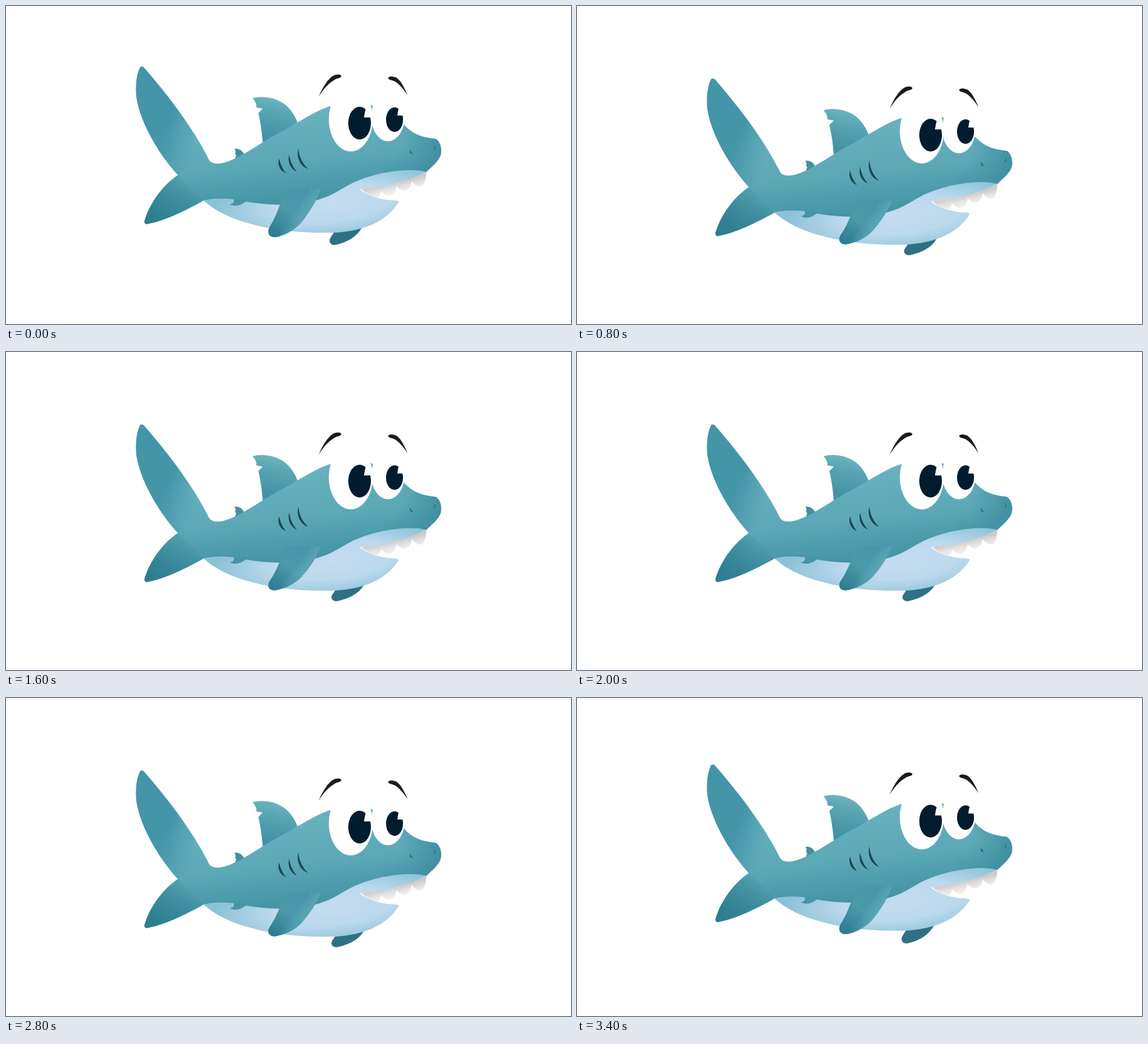
Write an HTML page that moves like this. It is 898 px wide and 505 px high and loops after 3600 ms.

```html
<!DOCTYPE html>
<html lang="en">
<head>
<meta charset="utf-8">
<title>Swimming shark</title>
<style>
  html, body { margin: 0; width: 100%; height: 100%; overflow: hidden; background: #fff; }
  svg { display: block; width: 100vw; height: 100vh; }
</style>
</head>
<body>
<svg viewBox="0 0 898 505" xmlns="http://www.w3.org/2000/svg">
  <defs>
    <linearGradient id="skin" gradientUnits="userSpaceOnUse" x1="470" y1="170" x2="486" y2="312">
      <stop offset="0" stop-color="#68b1bf"/>
      <stop offset=".5" stop-color="#5ca8b6"/>
      <stop offset="1" stop-color="#4293a4"/>
    </linearGradient>
    <linearGradient id="tailTone" gradientUnits="userSpaceOnUse" x1="256" y1="190" x2="306" y2="210">
      <stop offset="0" stop-color="#4495a8"/>
      <stop offset="1" stop-color="#4495a8" stop-opacity="0"/>
    </linearGradient>
    <linearGradient id="lobeTone" gradientUnits="userSpaceOnUse" x1="296" y1="276" x2="232" y2="336">
      <stop offset="0" stop-color="#2e7d91" stop-opacity="0"/>
      <stop offset="1" stop-color="#2e7d91"/>
    </linearGradient>
    <radialGradient id="noseTone" gradientUnits="userSpaceOnUse" cx="600" cy="215" r="96">
      <stop offset=".3" stop-color="#3f8fa1" stop-opacity="0"/>
      <stop offset="1" stop-color="#3f8fa1"/>
    </radialGradient>
    <radialGradient id="belly" gradientUnits="userSpaceOnUse" cx="0" cy="0" r="1"
      gradientTransform="translate(518 312) rotate(-6) scale(190 60)">
      <stop offset="0" stop-color="#c5dcf1"/>
      <stop offset=".5" stop-color="#bcd9ed"/>
      <stop offset="1" stop-color="#8bc1d6"/>
    </radialGradient>
    <linearGradient id="dorsal" gradientUnits="userSpaceOnUse" x1="436" y1="150" x2="424" y2="208">
      <stop offset="0" stop-color="#6bb2bf"/>
      <stop offset=".35" stop-color="#58a4b3"/>
      <stop offset="1" stop-color="#4293a5"/>
    </linearGradient>
    <linearGradient id="fin" gradientUnits="userSpaceOnUse" x1="478" y1="292" x2="428" y2="364">
      <stop offset="0" stop-color="#4696a7"/>
      <stop offset=".5" stop-color="#4b99aa"/>
      <stop offset="1" stop-color="#2e7d91"/>
    </linearGradient>
    <linearGradient id="finEdge" gradientUnits="userSpaceOnUse" x1="457" y1="323" x2="481" y2="338">
      <stop offset="0" stop-color="#6bb0c0" stop-opacity="0"/>
      <stop offset="1" stop-color="#6bb0c0" stop-opacity=".7"/>
    </linearGradient>
    <linearGradient id="teeth" gradientUnits="userSpaceOnUse" x1="613" y1="281" x2="618" y2="303">
      <stop offset="0" stop-color="#cdc8c8"/>
      <stop offset=".45" stop-color="#e6e4e4"/>
      <stop offset="1" stop-color="#fafafa"/>
    </linearGradient>
    <path id="bodyShape" d="M213 97.5 Q215 95 219 97.5 C254 137 299 196 322 243
      C325 250 334 252 346 249 C373 242 401 219 433 202 C464 186 488 168 515 159
      C540 151 566 151 581 158 C603 166 624 180 634 190 C645 202 660 209 683 211
      C691 216 693 228 691 236 C688 246 678 254 668 263.5
      C648 257 600 261 560 277 C534 287 522 303 483 311
      C450 317 413 317 378 310 C352 304 334 305 314 309
      C291 322 254 341 223 346.5 Q219 345 220.5 340 C229 312 250 284 273 268.5
      C246 239 213 187 207 143 C206 125 207 110 213 97.5Z"/>
  </defs>

  <g id="shark">
    <path id="farFin" fill="#2f7182" d="M571 340 C565 358 553 373 523 379.5 C514 380 512 372 517 366
      C522 358 528 350 534 340Z"/>
    <g fill="url(#dorsal)">
      <path d="M392 146.5 C406 142 428 145 443 156 C455 166 461 178 464 187 L408 217
        C407 201 404 181 401 170 L408 163 L398 161 Q399 155 392 146.5Z"/>
    </g>
    <path fill="#438fa1" d="M363 226.5 C372 226 377 231 379 237 L363 245 L366 237 L364 235 Q366 231 363 226.5Z"/>
    <path fill="url(#belly)" d="M314 309 C332 325 357 338 393 347 C436 359 481 360.500 520 360
      C570 358 606 341 624.500 311 Q622 308 612 308.500 C592 307 575 301 562 291
      C600 289 641 278 669 263 L640 250 L520 270 L480 300 L380 300Z"/>
    <path fill="url(#teeth)" d="M565 291 C601 288 641 277 668 264 Q668 279 661 287
      Q650 287 645 278 Q643 291 634 293 Q625 293 621 286 Q619 299 610 302
      Q600 301 597 294 Q594 304 588 304 Q575 300 565 291Z"/>
    <use href="#bodyShape" fill="url(#skin)"/>
    <use href="#bodyShape" fill="url(#noseTone)" clip-path="inset(0 0 0 395px)"/>
    <path fill="url(#tailTone)" d="M213 97.500 Q215 95 219 97.500 C254 137 299 196 322 243
      L273 268.500 C246 239 213 187 207 143 C206 125 207 110 213 97.500Z"/>
    <path fill="url(#lobeTone)" d="M314 309 C291 322 254 341 223 346.500 Q219 345 220.500 340
      C229 312 250 284 273 268.500Z"/>
    <path fill="#4793a7" d="M384 308 L362 307 Q364 313 356 315 C363 319 373 318 384 308Z"/>

    <g fill="#1b4650">
      <path d="M434 242 C431 251 435 262 445 265.500 C439 258 436 251 434 242Z"/>
      <path d="M450 236 C447 248 452 259 462.500 263 C455 255 452 247 450 236Z"/>
      <path d="M464.500 226 C461 241 468 255 480 258.500 C471 250 466 240 464.500 226Z"/>
      <path d="M643 228.500 Q640 234 648 235.500 Q643 233 643 228.500Z"/>
      <path d="M680 222 Q683 225 679.500 229 Q682.500 228 682 224Z"/>
    </g>

    <g id="nearFin">
      <path id="finShape" fill="url(#fin)" d="M445 292 Q474 288 500 290.500 C494 309 481 329 470 343
        C459 356 443 364 429 367 C418 368 414 360 419 351 C430 334 436 313 445 292Z"/>
      <use href="#finShape" fill="none"/>
      <path fill="url(#finEdge)" d="M484 290 L500 290.500 C494 309 481 329 470 343 C459 356 443 364 429 367
        Q453 342 484 290Z"/>
    </g>

    <g fill="#1d1a1c">
      <path d="M497 144 C503 129 513 113 523 109.500 C528 108 533 109 533 112 C531 115 526 114 521 118
        C512 123 504 133 497 144Z"/>
      <path d="M638 141.500 C633 128 626 117 620 113.500 C614 111 607 111.500 607.500 115
        C609 118 615 117.500 620 121 C627 126 633 134 638 141.500Z"/>
    </g>
    <g id="eyes">
      <g fill="#fff">
        <ellipse cx="548" cy="180" rx="35" ry="51"/>
        <ellipse cx="607" cy="176" rx="26.500" ry="39"/>
      </g>
      <g fill="#001c2e">
        <ellipse cx="562" cy="186" rx="18" ry="26"/>
        <ellipse cx="617.500" cy="180.500" rx="13.500" ry="19.500"/>
      </g>
      <path fill="#fff" d="M573 159 Q570 168 569 177 H580.500 L580 163Z M625 160 Q622.500 167 622 174 H631.500 L631 162Z"/>
    </g>
    <g id="lids" fill="#1b454e">
      <ellipse cx="548" cy="180" rx="35" ry="51"/>
      <ellipse cx="607" cy="176" rx="26.500" ry="39"/>
    </g>
  </g>
</svg>
<script>
  const STEP = 200, COUNT = 18, BLINK = 15;
  // One row per depth of the dive, from the top to the bottom of the bob.
  const poses = [
    { y: 0, near: 1, far: 1, dx: 0 },
    { y: 9.5, near: .98, far: 1.02, dx: 1.5 },
    { y: 19, near: .9, far: .93, dx: 3 },
    { y: 29, near: .71, far: .735, dx: 4 }
  ];
  const [shark, nearFin, farFin, eyes, lids] =
    ['shark', 'nearFin', 'farFin', 'eyes', 'lids'].map(id => document.getElementById(id));

  const squash = (el, dx, pivot, s) =>
    el.setAttribute('transform', `translate(${dx} ${pivot * (1 - s)}) scale(1 ${s})`);

  function draw(now) {
    const i = Math.floor(now / STEP) % COUNT;
    const depth = 3 - Math.abs(i % 6 - 3);
    const p = poses[depth];
    const drift = i < 6 ? depth * 1.3 : 0;
    shark.setAttribute('transform', `translate(0 ${p.y})`);
    squash(nearFin, 0, 290, p.near);
    squash(farFin, p.dx + drift, 340, p.far);
    eyes.style.display = i === BLINK ? 'none' : '';
    lids.style.display = i === BLINK ? '' : 'none';
  }

  const start = performance.now();
  function tick() {
    draw(performance.now() - start);
    requestAnimationFrame(tick);
  }
  tick();
</script>
</body>
</html>
```
